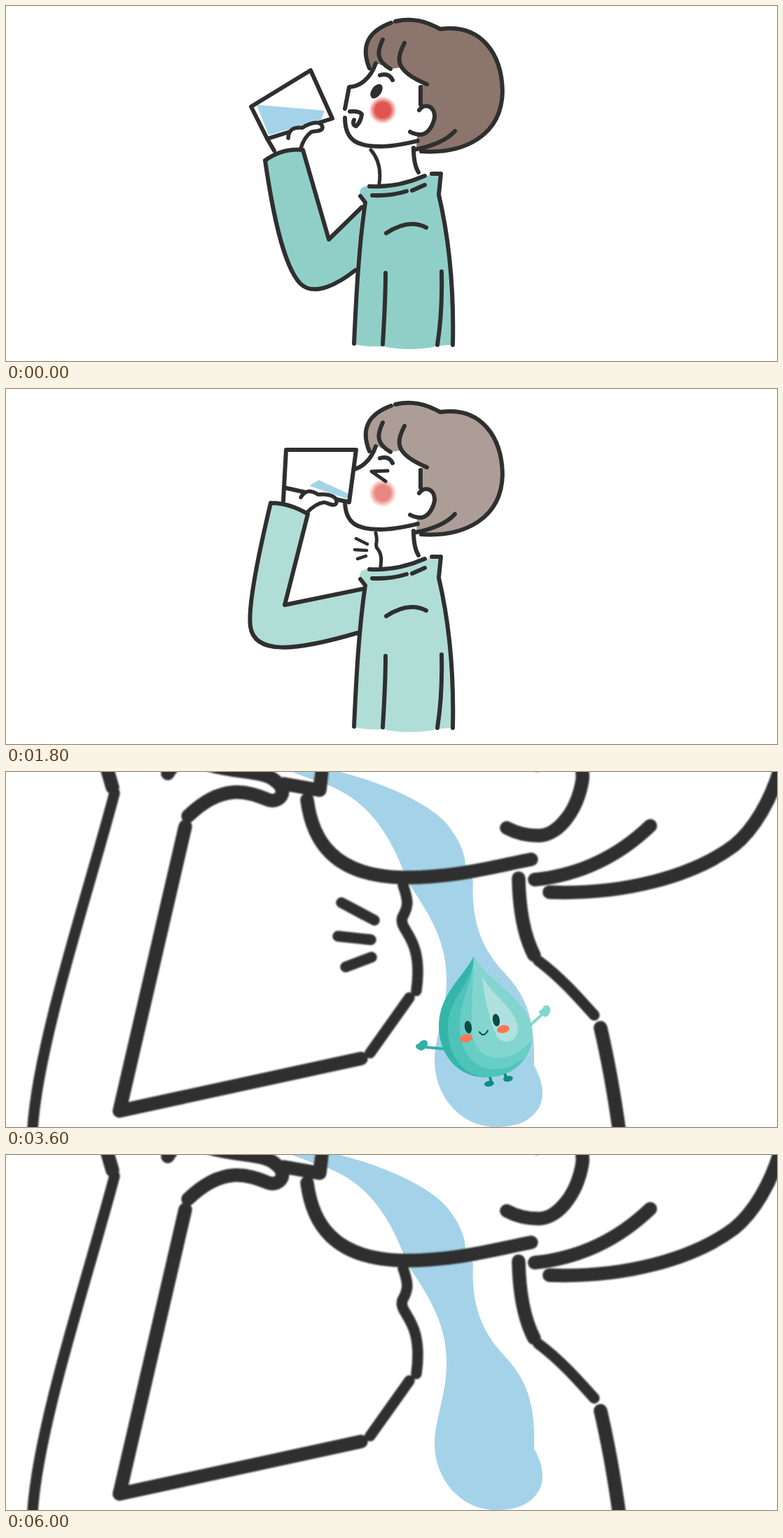
These frames come from a looping animation (1101 px wide and 508 px high, 6.3 s). An HTML page:

```html
<!DOCTYPE html>
<html lang="en">
<head>
<meta charset="utf-8">
<style>
  html, body { margin: 0; width: 100%; height: 100%; overflow: hidden; background: #fff; }
  svg { display: block; width: 1101px; height: 508px; }
  .line { fill: none; stroke: #2f2f2f; stroke-width: 6; stroke-linecap: round; stroke-linejoin: round; }
  .soft { filter: blur(1.3px); }
  text { font: 74px Lato, sans-serif; fill: #2f2f2f; }
  tspan { font-size: 40px; letter-spacing: 5.5px; }
</style>
</head>
<body>
<svg id="stage" viewBox="0 0 1101 508">
  <defs>
    <radialGradient id="blush">
      <stop offset=".55" stop-color="#e0564f"/>
      <stop offset="1" stop-color="#e0564f" stop-opacity="0"/>
    </radialGradient>
    <clipPath id="dropClip"><path d="M1 0C22 40 84 62 84 112C84 148 55 173 18 173C-22 173-49 140-49 100C-49 55-15 30 1 0Z"/></clipPath>
  </defs>
  <g id="scene"></g>
</svg>
<script>
const STEP = 300, STEPS = 21;
const TEAL = '#90cfc7', HAIR = '#8b756c', WATER = '#a4d3e9';

const fill = (d, color, extra = '') => `<path d="${d}" fill="${color}" ${extra}/>`;
const line = (d, width = 6) => `<path class="line" d="${d}" style="stroke-width:${width}px"/>`;
const group = (content, attrs) => `<g ${attrs}>${content}</g>`;
const lerp = (a, b, t) => a.map((v, i) => v + (b[i] - v) * t);

// sleeve: cuff-left, curve to elbow, curve to shoulder, cuff control, cuff-right, inner elbow, shoulder top
// hand: x, y, angle
const poses = [
  { sleeve: [370,221, 380,290, 395,370, 420,397, 440,417, 475,397, 499,378, 395,203, 424,206, 461,334, 508,288],
    glass: [350,144, 435,92, 466,161, 373,190], water: [360,143, 453,151, 449,161, 376,183],
    wrist: [383,207], hand: [403,189,-20] },
  { sleeve: [390,187, 388,270, 385,340, 405,374, 425,400, 460,390, 499,372, 415,180, 446,190, 437,326, 506,303],
    glass: [397,108, 494,89, 500,164, 403,161], water: [408,137, 496,153, 496,158, 407,153],
    wrist: [407,182], hand: [431,169,0] },
  { sleeve: [378,163, 362,230, 345,310, 349,340, 355,380, 410,376, 502,349, 405,163, 431,179, 398,309, 510,286],
    glass: [400,87, 500,87, 490,162, 397,141], water: [436,138, 447,132, 488,151, 486,155],
    wrist: [396,160], hand: [421,155,7] },
];

function poseAt(step) {
  if (step >= 4) return poses[step > 4 ? 2 : 1];
  const t = [0, .4, .8, .8][step], pose = {};
  for (const key in poses[0]) pose[key] = lerp(poses[0][key], poses[1][key], t);
  return pose;
}

function arm({ sleeve: s, glass, water, wrist, hand }, alpha) {
  const box = `M${glass}Z`;
  const outer = `M${s.slice(0, 2)}C${s.slice(2, 8)}C${s.slice(8, 14)}`;
  const cuff = `M${s.slice(0, 2)}Q${s.slice(14, 18)}`;
  const inner = `M${s.slice(16, 18)}L${s.slice(18)}`;
  const sleeve = `${outer}L${s.slice(20)}L${s.slice(18, 20)}L${s.slice(16, 18)}Q${s.slice(14, 16)} ${s.slice(0, 2)}Z`;
  const fingers = 'M0 0C5-12 14-12 24-7C42-11 54-6 51 3C48 8 39 3 34 3Q22 6 11 21';
  return fill(box, '#fff') + fill(`M${water}Z`, WATER, `stroke="${WATER}" stroke-width="3" stroke-linejoin="round"`) +
    line(box) +
    group(fill(fingers + 'L-18 18Z', '#fff') + line(fingers, 5.5),
      `transform="translate(${hand[0]} ${hand[1]}) rotate(${hand[2]})"`) +
    line(`M${glass.slice(6)}L${wrist}`) +
    fill(sleeve, '#fff') + fill(sleeve, TEAL, `opacity="${alpha}"`) +
    line(outer + cuff + inner);
}

function body(alpha) {
  const shape = 'M505 265Q506 276 513 282C503 350 500 420 497 484Q515 488 538 487Q570 494 605 489Q620 485 638 485C640 400 632 330 618 270L621 240H608C585 253 550 260 520 258Q508 256 505 265Z';
  return fill(shape, '#fff') + fill(shape, TEAL, `opacity="${alpha}"`) + line(
    'M506 272L513 281C503 350 500 420 497 483M519 258C550 260 575 253 598 243' +
    'M608 240H621L618 270C632 330 640 400 638 485M523 271Q550 272 572 265M580 264L598 256' +
    'M543 325Q575 304 600 317M542 382C542 420 540 450 538 484M622 380C623 420 620 460 616 485');
}

function head(step, alpha) {
  const neck = step < 3 ? 'M521 206C535 222 535 240 533 254'
    : step === 4 ? 'M528 206C534 222 529 232 530 241Q537 245 535 254'
    : 'M528 206C532 220 526 222 530 228C537 236 536 245 535 254';
  const eye = step >= 2 ? line('M545 117L522 118L542 132', 5)
    : '<ellipse cx="529" cy="122" rx="7" ry="11.5" fill="#2f2f2f" transform="rotate(35 529 122)"/>' +
      line('M491 151Q505 150 508 155Q507 165 500 172Q494 170 497 163');
  return group(
      fill('M519 89C505 55 520 30 553 23C580 16 600 22 620 33C680 25 708 70 709 122C708 185 655 212 593 208L586 203L592 113L601 112Q575 100 565 88L549 90L530 82Z', HAIR) +
      '<circle cx="538" cy="149" r="20" fill="url(#blush)"/>', `opacity="${alpha}"`) +
    fill('M590 148C598 138 613 143 612 160C608 178 598 185 590 184Q582 183 577 179Z', '#fff') +
    line('M569 53C558 75 553 92 601 112M538 48C530 65 528 78 549 90M519 89C505 55 520 35 550 24' +
      'M556 22C580 16 600 22 620 33C680 25 708 70 709 122C708 185 655 212 593 208M586 205Q625 197 641 179' +
      'M592 116V141M590 149C598 138 613 143 612 160C608 178 598 185 590 184Q582 183 577 180' +
      'M484 147L490 116C505 115 520 105 528 82M484 160C484 195 505 201 535 201C555 201 575 196 588 193' +
      'M582 203C582 220 584 230 589 238M534 99Q547 95 552 106') +
    line(neck, 5) + eye +
    (step >= 3 ? line('M500 214L516 222M498 230L515 231M502 243L514 239', 4.5) : '');
}

const gulp = ([x, y]) => `<text transform="translate(${x} ${y}) rotate(-26)">GLEK<tspan dx="2">...</tspan></text>`;
const gulps = [[263, 130], [165, 349], [679, 409]];

function drinker(step) {
  const alpha = step < 6 ? 1 : step === 6 ? .7 : .35;
  const words = step < 6 ? gulps.slice(0, Math.max(0, step - 2)) : [];
  return head(step, alpha) + arm(poseAt(step), alpha) + body(alpha) + words.map(gulp).join('');
}

// The swallow marks beside the throat blink during the close-up.
const swallowing = step => step < 13 || [14, 15, 17].includes(step);

function outline(step) {
  const [scale, x, y] = step < 10 ? [.3187, 349, 154] : step === 10 ? [.4931, 266, 133]
    : step === 11 ? [.641, 192, 95] : [1, 0, 0];
  const stream = 'M455-5C520 8 600 40 630 75C650 100 656 120 656 135L667 155C664 215 680 250 705 280C735 312 757 340 754 420C770 448 768 470 760 482C745 505 720 508 700 508C650 508 612 465 612 412C612 380 630 340 629 295C628 240 605 205 577 162L567 140C545 85 515 40 458 18Z';
  const strokes =
    line('M149-41L162-209H474L448 26L397 17M149-41L241-23M149-41L141-16L152 22' +
      'M231 2C245-22 265-25 290-10C330 2 370-2 385 13C405 28 390 45 375 40C345 28 310 15 260 63' +
      'M256 78L162 485L507 410M430 40C437 95 465 150 570 151C640 151 690 137 750 125' +
      'M732 152C733 200 740 235 754 262M849 366C885 520 905 740 907 1036M490 616L478 764L464 1036' +
      'M758-10C780-45 828-35 823 12C815 60 785 92 760 91C742 91 728 87 715 80M766-122V-41' +
      'M755 154C815 148 870 125 920 77M535-203C500-250 510-370 640-405M567-229C545-158 504-122 470-122' +
      'M655-410C730-425 790-400 850-379C960-395 1070-330 1110-180C1140-60 1095 60 1040 105C980 150 880 176 776 172', 19.5) +
    line('M155 30C120 165 46 385 38 510Q34 580 42 636M48 649C88 687 119 690 160 683L474 622' +
      'M520 402L576 323M760 270C790 292 815 320 840 348' +
      'M567 162C575 185 575 192 566 208C560 228 597 235 586 313' +
      'M681 659L677 760L665 1036M853 679L851 764L840 1036', 15.5) +
    (swallowing(step) ? line('M479 187L526 212M474 235L521 240M485 279L522 265', 15.5) : '');
  return group(
    fill('M273-51L306-73L440-9V12Q360-20 273-42Z', WATER) +
    (step > 8 ? fill(stream, WATER) : '') + group(strokes, 'class="soft"'),
    `transform="translate(${x} ${y}) scale(${scale})"`);
}

const slide = [[667, 264], [667, 264], [685, 310], [706, 350], [729, 391], [744, 425], [759, 451], [773, 488]];

function drop([x, y], waving) {
  const layer = (left, right, bottom, color) =>
    fill(`M1 0C22 40 90 62 90 ${right}C60 ${bottom} ${left} ${bottom} ${left} 100C${left} 60 0 40 1 0Z`, color);
  const oval = (cx, cy, rx, ry, color, turn = -10) =>
    `<ellipse rx="${rx}" ry="${ry}" fill="${color}" transform="translate(${cx} ${cy}) rotate(${turn})"/>`;
  const limb = (d, color, width) => `<path d="${d}" fill="none" stroke="${color}" stroke-width="${width}" stroke-linecap="round"/>`;
  const hand = (hx, hy, color, turn) => oval(hx, hy, 6, 8.5, color, turn) + oval(hx - 5, hy + 2, 5, 4, color, 20);
  const dark = '#2fb0a5', pale = '#82d6cf', foot = '#0f8c80', ink = '#0a4a45';
  const left = waving ? [-72, 127] : [-61, 111], right = waving ? [104, 78] : [92, 68];
  return group(
    limb(`M-43 132L${waving ? '-66 130' : '-60 117'}`, dark, 4) + hand(...left, dark, 40) +
    limb(`M83 97L${right}`, pale, 4) + hand(...right, pale, 15) +
    limb('M23 168L26 180M45 165L47 175', foot, 4) + oval(23, 182, 7, 4, foot) + oval(50, 175, 7, 4, foot) +
    group('<path d="M-60 0H100V180H-60Z" fill="#35b5aa"/>' + layer(-36, 130, 192, '#4ec3ba') +
      layer(-19, 125, 177, '#67cdc5') + layer(-2, 112, 158, pale), 'clip-path="url(#dropClip)"') +
    fill('M13 28C25 55 64 75 64 105C62 125 40 127 33 112C22 85 15 55 13 28Z', '#b0e1df') +
    (waving ? oval(-7, 101, 5, 9, ink) + oval(33, 91, 5, 9, ink)
      : limb('M-15 92L2 95L-10 106M31 79L21 91L39 94', ink, 3)) +
    oval(-10, 117, 9, 5.5, '#ff7752') + oval(43, 104, 9, 5.5, '#ff7752') +
    limb('M9 108Q15 117 21 106', ink, 2), `transform="translate(${x} ${y})"`);
}

const scene = document.getElementById('scene');
let shown = -1;
function frame(now) {
  const step = Math.floor(now / STEP) % STEPS;
  if (step !== shown) {
    shown = step;
    const tip = slide[step - 12];
    scene.innerHTML = step < 8 ? drinker(step) : outline(step) + (tip ? drop(tip, step === 12) : '');
  }
  requestAnimationFrame(() => frame(performance.now()));
}
frame(0);
</script>
</body>
</html>
```
